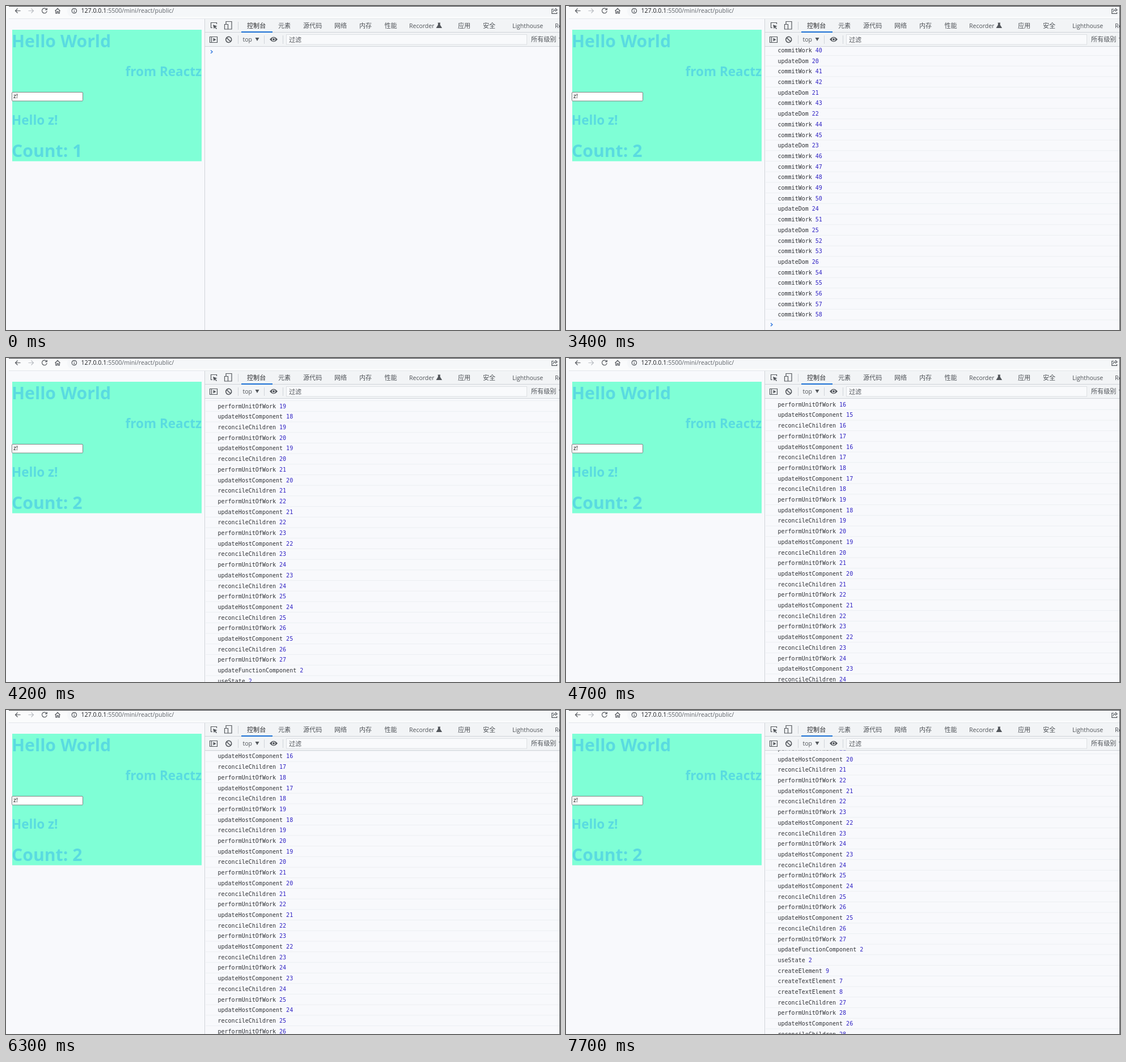
Write an HTML page that moves like this. It is 977 px wide and 573 px high and loops after 8 s.

```html
<!DOCTYPE html>
<html lang="zh">
<head>
<meta charset="utf-8">
<title>Console log</title>
<style>
  html, body { margin: 0; width: 100%; height: 100%; overflow: hidden; background: #f8f9fc; }
  svg { display: block; }
  text { white-space: pre; }
  .ui { font: 10.5px "Open Sans", "Noto Sans", sans-serif; fill: #505459; }
  .cjk { font: 11.1px "Noto Sans CJK SC", "Noto Sans CJK", sans-serif; fill: #505459; }
  .page { font: 700 30.2px "Open Sans", "Noto Sans", sans-serif; fill: #5adbe0; }
  .page .h2 { font-size: 22.5px; }
  .log { font: 10.03px "DejaVu Sans Mono", monospace; fill: #303236; }
  .log .num { fill: #2f22c4; }
  .icon { fill: none; stroke: #53575c; stroke-width: 1.2; }
  .rule { stroke: #d0d4d9; }
</style>
</head>
<body>
<svg width="977" height="573" viewBox="0 0 977 573">
  <defs><clipPath id="view"><path d="M352 71.5H976V573H352z"/></clipPath></defs>
  <rect width="977" height="573" fill="#f8f9fc"/>

  <!-- address bar -->
  <rect width="977" height="22" fill="#fafbfc"/>
  <rect x="108" width="869" height="19" rx="9" fill="#f5f7f9"/>
  <path d="M5 22.5H977" stroke="#e3e6ea"/>
  <g class="icon">
    <path d="M25.5 8.5H16.5M20.5 4.5L16.5 8.5L20.5 12.5"/>
    <path d="M39.5 8.5H48.5M44.5 4.5L48.5 8.5L44.5 12.5" stroke="#b9bdc2"/>
    <path d="M71.3 5.6A4.4 4.4 0 1 0 72.2 9M72.3 3.5V6.7H69"/>
    <path d="M86.5 8.7L91 4.4L95.500 8.700M87.800 8V12.800H90V9.800H92.200V12.800H94.300V8"/>
    <circle cx="120.300" cy="8.500" r="4.200"/>
    <path d="M120.300 8V11M120.300 6V7.100"/>
    <path d="M966 5.500H962.700V13.300H971.500V11M964.800 10.500Q965.500 6.800 969.500 6.800M968.500 4L972 6.900L968.500 9.600"/>
  </g>
  <text class="ui" x="132.500" y="12.300" style="font-size:10.600px;fill:#5f6368"><tspan fill="#202124">127.0.0.1</tspan>:5500/mini/react/public/</text>

  <!-- web page -->
  <rect x="11" y="42" width="334" height="232.500" fill="#7fffd6"/>
  <g class="page">
    <text x="10" y="73">Hello World</text>
    <text class="h2" x="345" y="123.500" text-anchor="end">from Reactz</text>
    <text class="h2" x="10" y="210">Hello z!</text>
    <text id="count" x="10" y="267">Count: 1</text>
  </g>
  <rect x="10.500" y="152.500" width="125" height="15.500" rx="1.500" fill="#fff" stroke="#7b8480"/>
  <text x="13" y="163.200" font-size="10.500" font-family="Open Sans, sans-serif" fill="#111">z!</text>

  <!-- developer tools -->
  <rect x="351" y="23" width="626" height="48" fill="#f2f4f6"/>
  <path class="rule" d="M351 46.500H977M351 71.500H977M350.500 23V573M409.500 28V42M409.500 52V67M455.500 52V67M488.500 52V67"/>
  <path d="M415 46H470" stroke="#1a6fd4" stroke-width="2"/>
  <g class="icon">
    <path d="M364 38.500H361.500V29.500H371.500V32"/>
    <path d="M365 33L372.500 35.700L369.500 37L372 40L370.800 41L368.300 38L366.800 40.500z" fill="#53575c" stroke="none"/>
    <path d="M388 32V27.500H398V41H392M385.500 32.500H391.500V41H385.500z"/>
    <path d="M359.500 54.500H372.500V64.500H359.500zM362.500 54.500V64.500"/>
    <path d="M365.500 56.500L370.500 59.500L365.500 62.500z" fill="#53575c" stroke="none"/>
    <path d="M396.200 63A5 5 0 1 1 396.300 62.900M389 56L396 63" stroke-width="1.600"/>
    <path d="M465 59Q472 50.500 479 59Q472 67.500 465 59z" fill="#53575c" stroke="none"/>
    <circle cx="472" cy="59" r="2.500" stroke="#f2f4f6"/>
    <path d="M761.500 30H766M762.500 30V33.500L759.500 38.500H768L765 33.500V30z" fill="#53575c"/>
    <path d="M439.500 56H446.500L443 62zM975 56H977V60z" fill="#53575c" stroke="none"/>
  </g>
  <rect x="494.500" y="50.500" width="424" height="17.500" fill="#f9fafc" stroke="#dcdfe3"/>
  <g class="cjk">
    <text x="425" y="38.700" style="fill:#27292c">控制台</text>
    <text x="480" y="38.700">元素</text>
    <text x="524" y="38.700">源代码</text>
    <text x="579" y="38.700">网络</text>
    <text x="623" y="38.700">内存</text>
    <text x="667.500" y="38.700">性能</text>
    <text x="797" y="38.700">应用</text>
    <text x="841" y="38.700">安全</text>
    <text x="499" y="63.500">过滤</text>
    <text id="level" x="926" y="63.200">所有级别</text>
  </g>
  <g class="ui">
    <text x="711" y="38.500">Recorder</text>
    <text x="893" y="38.500">Lighthouse</text>
    <text x="968" y="38.500">Re</text>
    <text x="417.500" y="63">top</text>
  </g>

  <g clip-path="url(#view)">
    <g id="scroller">
      <g id="rows" class="log"></g>
      <path id="prompt" d="M361 78.300L364 81L361 83.700" fill="none" stroke="#3b7ee0" stroke-width="1.500"/>
    </g>
  </g>
  <path d="M5 0.500H977" stroke="#3a3c40"/>
  <path d="M976.500 0V573" stroke="#55585c"/>
</svg>
<script>
  const LOOP = 8000, PITCH = 18.7, NOTCH = 73.55, BOTTOM = 17 * NOTCH;
  const $ = id => document.getElementById(id);

  function buildLog() {
    const log = [];
    const add = (name, n) => log.push([name, n]);
    const unit = k => add('performUnitOfWork', k);
    const host = (n, k) => { add('updateHostComponent', n); add('reconcileChildren', k); };

    for (let k = 16; k <= 26; k++) { unit(k); host(k - 1, k); }
    unit(27);
    add('updateFunctionComponent', 2);
    add('useState', 2);
    add('createElement', 9);
    add('createTextElement', 7);
    add('createTextElement', 8);
    add('reconcileChildren', 27);
    for (let k = 28; k <= 30; k++) { unit(k); host(k - 2, k); }
    add('commitRoot', 2);

    // commits between successive DOM updates
    let work = 30, dom = 14;
    for (const run of [1, 1, 1, 3, 2, 1, 2, 2, 1, 2, 5, 1, 2, 5]) {
      for (let i = 0; i < run; i++) add('commitWork', work++);
      if (dom <= 26) add('updateDom', dom++);
    }
    return log;
  }

  function makeRow([name, n], i) {
    const y = 82 + i * PITCH;
    return `<g><path d="M352 ${y + 9.3}H976" stroke="#eceff2"/>` +
      `<text x="373.5" y="${y + 3.7}">${name} <tspan class="num">${n}</tspan></text></g>`;
  }

  // scroll offsets, each held until the next
  const scroll = [[0, 0], [1700, BOTTOM]];
  [1238, 1060, 850, 634.3, 480, 372, 285, 215, 165.3, 148, 108, 62, 18, 0]
    .forEach((y, i) => scroll.push([3400 + i * 100, y]));
  [5700, 6300, 7000, 7500].forEach((start, n) =>
    [0.02, 0.68, 1].forEach((part, i) => scroll.push([start + i * 100, (n + part) * NOTCH])));

  const log = buildLog();
  $('rows').innerHTML = log.map(makeRow).join('');
  const rows = [...$('rows').children];
  let shown = -1;

  function draw(t) {
    const visible = t < 1600 ? 0 : t < 1700 ? 13 : log.length;
    if (visible !== shown) {
      rows.forEach((row, i) => row.style.display = i < visible ? '' : 'none');
      $('prompt').setAttribute('transform', `translate(0 ${visible * PITCH})`);
      $('count').textContent = 'Count: ' + (visible ? 2 : 1);
      shown = visible;
    }
    const y = scroll.findLast(([at]) => at <= t)[1];
    $('scroller').setAttribute('transform', `translate(0 ${-y})`);
    $('level').style.fill = t >= 300 && t < 400 ? '#303236' : '';
  }

  const origin = performance.now();
  function tick() {
    draw((performance.now() - origin) % LOOP);
    requestAnimationFrame(tick);
  }
  tick();
</script>
</body>
</html>
```
